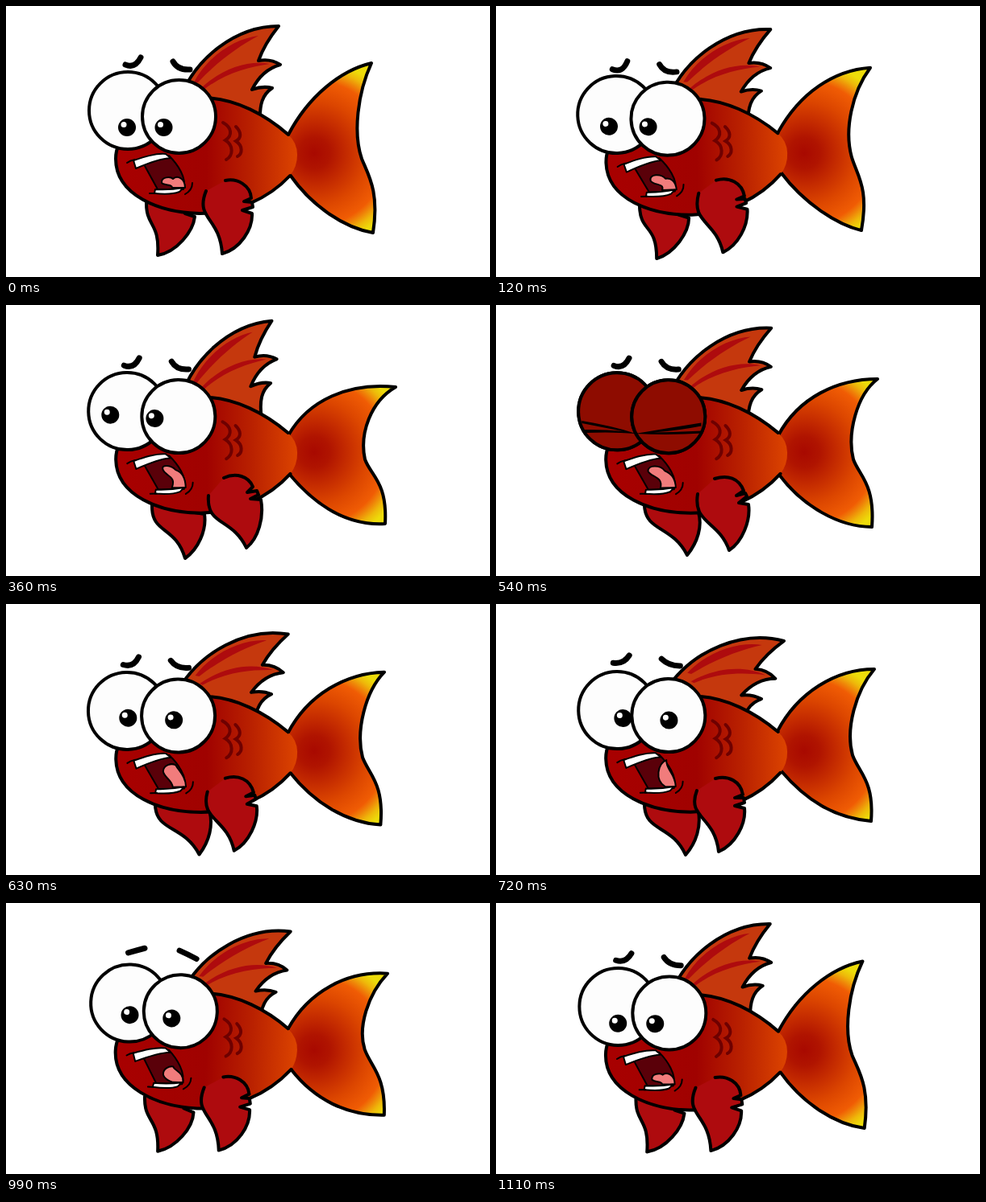
An HTML page for the animation above (1.14 s loop, 600 px wide and 337 px high).

```html
<!DOCTYPE html>
<html lang="en">
<head>
<meta charset="utf-8">
<title>Worried fish</title>
<style>
  html, body { margin: 0; width: 100%; height: 100%; overflow: hidden; background: #fff; }
  svg { display: block; width: 100vw; height: 100vh; }
  .ink { stroke: #000; stroke-width: 4; stroke-linejoin: round; stroke-linecap: round; }
  .line { fill: none; }
  .thin { stroke-width: 2; }
  .fin { fill: #ae0b0e; }
  .brow { fill: none; stroke: #000; stroke-width: 7; stroke-linecap: round; }
  .scale { fill: none; stroke: #6e0000; stroke-width: 4; stroke-linecap: round; }
</style>
</head>
<body>
<svg viewBox="0 0 600 337" preserveAspectRatio="none">
  <defs>
    <linearGradient id="skin" gradientUnits="userSpaceOnUse" x1="136" y1="0" x2="361" y2="0">
      <stop offset="0" stop-color="#a80000"/>
      <stop offset=".5" stop-color="#a00200"/>
      <stop offset=".75" stop-color="#b92100"/>
      <stop offset="1" stop-color="#dc4400"/>
    </linearGradient>
    <radialGradient id="flame" gradientUnits="userSpaceOnUse" cx="382" cy="183" r="130">
      <stop offset="0" stop-color="#a80900"/>
      <stop offset=".15" stop-color="#b01400"/>
      <stop offset=".5" stop-color="#dc4600"/>
      <stop offset=".69" stop-color="#f05c04"/>
      <stop offset=".74" stop-color="#ef8008"/>
      <stop offset=".81" stop-color="#eeb80a"/>
      <stop offset=".88" stop-color="#eddc0a"/>
    </radialGradient>
  </defs>

  <path id="tail" class="ink" fill="url(#flame)"/>
  <g id="dorsal">
    <path class="ink" fill="#c5380d" d="M212,125 C232,62 288,25 338,25 C326,40 318,54 313,68 Q328,65 340,73 C322,78 312,90 305,104 Q318,99 330,102 C318,110 314,122 315,145"/>
    <path class="fin" d="M233,95 C250,62 285,40 313,37 C290,49 262,69 238,95Z M240,104 C266,78 300,67 327,72 C300,76 270,84 244,105Z"/>
  </g>
  <path id="farFin" class="ink fin"/>

  <g class="turn">
    <path id="rear" fill="url(#skin)"/>
    <path id="body" class="ink" fill="url(#skin)"/>
    <path class="scale" d="M269,145 C280,151 281,161 272,167 C282,173 282,186 273,191 M285,150 C292,157 292,164 285,168 C294,174 293,184 287,187"/>

    <path class="ink thin" fill="#5a0009" d="M171,197 L188,228 L220,228 C225,214 212,196 202,186Z"/>
    <path id="tongue" class="ink thin" fill="#f17c7c"/>
    <path class="ink thin" fill="#fff" d="M158,192 L161,202 C175,196 190,190 204,189 L198,184 C185,183 170,188 158,192Z"/>
    <path class="ink thin" fill="#fff" d="M185,228 L184,233 Q205,235 215,231 L220,226 Q203,229 185,228Z"/>
    <path class="ink thin line" d="M150,195 Q154,192 160,191 M178,233 L186,233 M231,220 Q231,229 222,234"/>

    <path id="browL" class="brow"/>
    <path id="browR" class="brow"/>
    <circle class="ink" cx="151" cy="130" r="48" fill="#fdfdfd"/>
    <g id="pupilL"><circle cx="151" cy="130" r="11"/><circle cx="147" cy="126.5" r="3.5" fill="#fff"/></g>
    <circle class="ink lid" cx="151" cy="130" r="48" fill="#8e0c00"/>
    <path class="lid" d="M107,141 Q145,148 174,158 Q144,155 109,156 L108,152 Q135,152 158,155 Q135,150 107,144Z"/>
    <circle class="ink" cx="214.5" cy="137.5" r="45.5" fill="#fdfdfd"/>
    <g id="pupilR"><circle cx="214.5" cy="137.5" r="11"/><circle cx="210.5" cy="134" r="3.5" fill="#fff"/></g>
    <circle class="ink lid" cx="214.5" cy="137.5" r="45.5" fill="#8e0c00"/>
    <path class="lid" d="M255,146 Q213,152 173,158 Q215,161 257,159 L257,156 Q225,157 196,157 Q228,155 255,150Z"/>
  </g>
  <path id="nearFin" class="ink fin"/>
</svg>

<script>
const LOOP = 1140, STEP = 30;
const KEYS = [0, 240, 360, 540, 720, 870];
const N = KEYS.length;
const $ = id => document.getElementById(id);
const all = sel => [...document.querySelectorAll(sel)];
const still = KEYS.map(() => 0);

const keyTime = i => KEYS[(i + N) % N] + LOOP * Math.floor(i / N);

// Smooth cyclic curve through one value per key time
function curve(vals, t) {
  const at = i => vals[(i + N) % N];
  const slope = i => (at(i + 1) - at(i - 1)) / (keyTime(i + 1) - keyTime(i - 1));
  let i = N - 1;
  while (KEYS[i] > t) i--;
  const span = keyTime(i + 1) - keyTime(i);
  const u = (t - keyTime(i)) / span, v = 1 - u;
  return at(i) * v * v * (1 + 2 * u) + at(i + 1) * u * u * (3 - 2 * u)
    + span * u * v * (slope(i) * v - slope(i + 1) * u);
}

// Same path commands in every pose; only the numbers blend
function morph(id, poses) {
  const el = $(id), num = /-?\d+(\.\d+)?/g;
  const rows = poses.map(p => p.match(num).map(Number));
  const cols = rows[0].map((_, k) => rows.map(r => r[k]));
  return t => {
    let k = 0;
    el.setAttribute('d', poses[0].replace(num, () => curve(cols[k++], t).toFixed(2)));
  };
}

function move(els, xs, ys, degs = still, cx = 0, cy = 0) {
  return t => {
    const [x, y, deg] = [xs, ys, degs].map(v => curve(v, t).toFixed(3));
    els.forEach(el =>
      el.setAttribute('transform', `translate(${x} ${y}) rotate(${deg} ${cx} ${cy})`));
  };
}

function blink(from, to) {
  const lids = all('.lid');
  return t => lids.forEach(el => el.style.display = t >= from && t < to ? '' : 'none');
}

const worryL = 'M148,73 Q160,78 167,64', worryR = 'M207,69 Q213,80 228,79';
const flank = 'M352,211 C325,240 285,258 240,258 C190,257 136,235 136,190 Q136,180 140,172 L240,114 C285,113 325,138 350,160';
const raised = 'M356,200 C328,234 285,257 240,257 C190,257 136,235 136,190 Q136,180 140,172 L240,114 C284,111 323,131 348,150';
const stub = 'M338,180 L350,160 Q361,170 361,185 Q361,200 352,211';
const stubUp = 'M338,172 L348,150 Q361,162 361,177 Q361,190 356,200';

const parts = [
  move(all('.turn'), still, still, [0, -3.6, -0.9, -1, -0.9, 3.2], 285, 180),
  move([$('dorsal')], [0, -2, -1, -1, -1, 6], [0, 2, 0.2, 0.2, 0, 1.5],
    [0, 5.3, -4.9, 2.9, 15.3, 14.4], 270, 110),
  move([$('pupilL')], [-1, -19.4, -21, -7, 7, 1.5], [21, 5.3, 4.2, 7, 10, 8]),
  move([$('pupilR')], [-19, -29.3, -29.5, -14, 0.5, -4.2], [13.5, 3.2, 2, 4, 6, 4.8]),
  blink(480, 630),
  morph('body', [flank, flank, flank, flank, flank, raised]),
  morph('rear', [stub, stub, stub, stub, stub, stubUp]),
  morph('browL', [worryL, worryL, worryL, worryL,
    'M147,71 Q160,73 167,62', 'M146,64 Q157,55 167,59']),
  morph('browR', [worryR, worryR, worryR, worryR,
    'M207,67 Q216,76 230,76', 'M212,58 Q225,58 234,67']),
  morph('tail', [
    'M350,160 C375,112 415,80 453,71 C436,108 430,158 441,190 C449,210 463,230 455,282 C420,276 380,250 352,210',
    'M349,155 C378,105 425,83 481,89 C450,110 435,150 442,185 C448,212 465,218 456,272 C425,266 383,239 355,205',
    'M350,162 C375,118 425,96 483,102 C452,120 438,160 445,192 C452,212 473,220 470,272 C420,275 380,245 351,210',
    'M350,162 C375,115 423,92 473,92 C447,112 435,160 443,192 C450,212 470,222 466,276 C425,276 380,250 351,211',
    'M349,158 C374,110 421,81 469,81 C446,108 433,155 442,188 C450,210 469,220 465,270 C420,266 385,245 353,207',
    'M349,154 C375,108 429,87 489,100 C458,117 440,152 447,177 C454,200 476,202 478,251 C425,256 385,240 355,205']),
  morph('farFin', [
    'M174,243 C173,275 191,268 188,310 C212,306 232,280 234,262 L222,258',
    'M182,251 C183,290 209,272 214,318 C232,308 248,283 245,264 L233,261',
    'M181,249 C180,285 210,274 222,315 C238,304 249,280 246,260 L234,258',
    'M184,250 C186,282 218,274 237,311 C250,295 256,275 251,258 L238,256',
    'M184,250 C185,284 218,274 235,312 C249,296 254,276 251,258 L238,256',
    'M173,241 C172,275 195,267 197,309 C217,302 236,279 235,259 L223,254']),
  morph('nearFin', [
    'M248,230 C234,265 265,262 268,308 C290,302 306,278 305,258 L293,254 L306,250 L305,244 L295,243 L304,239 C303,223 287,214 272,217',
    'M254,236 C249,276 280,270 296,304 C311,292 320,268 318,246 L304,244 L314,239 L312,234 L301,237 L311,232 C306,216 290,209 273,216',
    'M251,237 C248,275 280,264 298,302 C313,290 320,264 316,242 L303,241 L313,236 L311,231 L299,233 L306,226 C301,213 285,208 270,215',
    'M250,235 C244,272 276,268 289,305 C305,295 316,268 313,248 L301,246 L311,238 L309,234 L298,237 L307,231 C301,215 287,211 271,216',
    'M249,232 C236,266 271,263 276,308 C297,299 310,273 308,254 L296,251 L308,247 L307,241 L296,241 L306,237 C303,220 288,213 272,217',
    'M245,230 C232,265 263,261 265,307 C288,300 303,276 302,255 L290,252 L302,248 L301,241 L291,241 L301,236 C298,220 283,213 268,216']),
  morph('tongue', [
    'M193,220 C192,212 204,212 207,215 C212,210 222,214 222,226 L206,226 C206,221 197,224 193,220',
    'M189,206 C186,196 204,197 211,206 C218,211 221,216 222,226 L203,226 C210,213 192,215 189,206',
    'M194,203 C192,196 205,198 210,204 C218,207 222,214 222,226 L205,226 C211,211 197,212 194,203',
    'M188,205 C188,197 203,197 209,205 C218,209 222,216 222,226 L203,226 C207,212 192,213 188,205',
    'M201,208 C202,200 206,195 211,193 C210,205 222,210 222,226 L209,226 C203,222 200,216 201,208',
    'M199,213 C198,205 203,199 210,198 C209,212 222,212 221,226 L210,226 C202,226 199,220 199,213'])
];

function draw() {
  const t = Math.floor(performance.now() / STEP) * STEP % LOOP;
  parts.forEach(part => part(t));
  requestAnimationFrame(draw);
}
draw();
</script>
</body>
</html>
```
